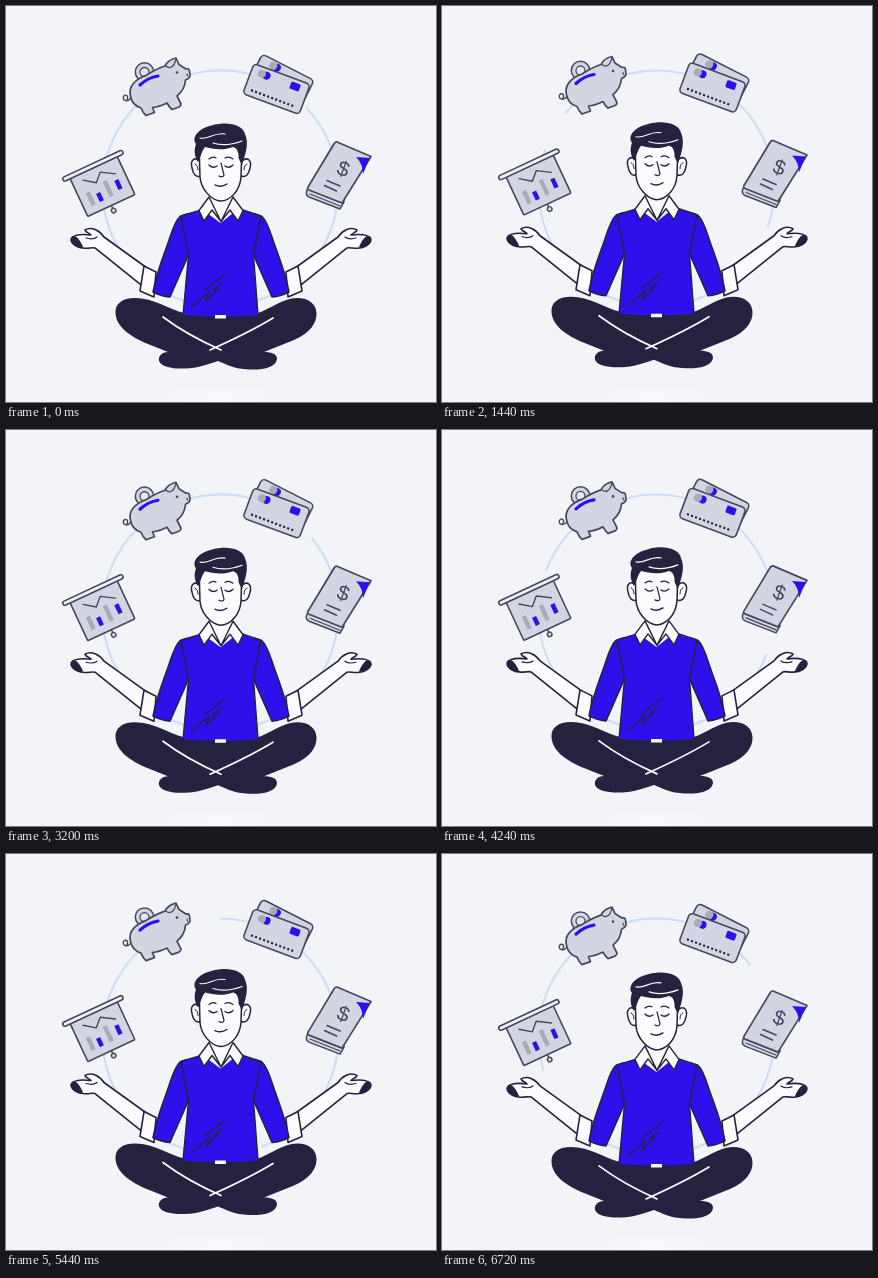
These frames come from a looping animation (430x396 px, 6800 ms). An HTML page with a canvas:

```html
<!DOCTYPE html>
<html lang="en">
<head>
<meta charset="utf-8">
<title>Calm finances</title>
<style>
html, body { margin: 0; width: 100%; height: 100%; overflow: hidden; background: #f3f4f8; }
canvas { display: block; width: 430px; height: 396px; }
</style>
</head>
<body>
<canvas id="stage" width="430" height="396"></canvas>
<script>
const ctx = document.getElementById('stage').getContext('2d');
const LOOP = 6800, STEP = 80, CYCLE = 3130;
const BG = '#f3f4f8', NAVY = '#25223f', BLUE = '#2d10ea', GREY = '#d3d6e2';
const LINE = '#474660', SHADE = '#a9abb9', RING = '#d0def3', WHITE = '#fcfcfe';
const TAU = Math.PI * 2, rad = d => d * Math.PI / 180;

function shape(d, fill, stroke, width = 1.5) {
  const p = new Path2D(d);
  if (fill) { ctx.fillStyle = fill; ctx.fill(p); }
  if (stroke) { ctx.strokeStyle = stroke; ctx.lineWidth = width; ctx.stroke(p); }
}

function disc(x, y, r, fill, stroke, width = 1.5) {
  ctx.beginPath();
  ctx.arc(x, y, r, 0, TAU);
  if (fill) { ctx.fillStyle = fill; ctx.fill(); }
  if (stroke) { ctx.strokeStyle = stroke; ctx.lineWidth = width; ctx.stroke(); }
}

function box(x, y, w, h, r, fill, stroke) {
  ctx.beginPath();
  ctx.roundRect(x, y, w, h, r);
  ctx.fillStyle = fill;
  ctx.fill();
  if (stroke) { ctx.strokeStyle = stroke; ctx.lineWidth = 1.6; ctx.stroke(); }
}

function at(x, y, angle, draw) {
  ctx.save();
  ctx.translate(x, y);
  ctx.rotate(rad(angle));
  draw();
  ctx.restore();
}

function bothSides(draw) {
  draw();
  ctx.save();
  ctx.translate(430, 0);
  ctx.scale(-1, 1);
  draw();
  ctx.restore();
}

function glow() {
  ctx.save();
  ctx.translate(212, 390);
  ctx.scale(1, 0.14);
  const g = ctx.createRadialGradient(0, 0, 10, 0, 0, 68);
  g.addColorStop(0, 'rgba(255,255,255,.5)');
  g.addColorStop(1, 'rgba(255,255,255,0)');
  ctx.fillStyle = g;
  ctx.fillRect(-70, -70, 140, 140);
  ctx.restore();
}

// Two opposite gaps travel clockwise around the ring.
function ring(t) {
  const end = 316.7 + 180 * t / CYCLE;
  ctx.strokeStyle = RING;
  ctx.lineWidth = 2.2;
  for (const turn of [0, 180]) {
    ctx.beginPath();
    ctx.arc(214.3, 182.5, 118, rad(end + turn), rad(end + turn + 160));
    ctx.stroke();
  }
}

function chart() {
  at(96.5, 180.5, -25, () => {
    shape('M0 21V24', null, LINE);
    disc(0, 26.5, 2.3, GREY, LINE, 1.4);
    box(-26, -21, 52, 42, 1, GREY, LINE);
    box(-33, -25, 66, 4.4, 2.2, '#eef0f6', LINE);
    box(-18, -1, 4.5, 14, 0, SHADE);
    box(-9, 4, 4.5, 9, 0, BLUE);
    box(2, -4, 4.5, 17, 0, SHADE);
    box(13, 0, 4.5, 10, 0, BLUE);
    shape('M-15 -14L-4 -6L4 -14L17 -6', null, LINE, 1.4);
  });
}

function pig() {
  disc(138.5, 66, 9.2, GREY, LINE);
  disc(138.5, 66, 4.5, '#e5e7ef', LINE, 1.3);
  shape('M125 92C121 97 116 94 117.500 90.500C119.500 87.500 123 90 121 93.500', null, LINE, 1.4);
  shape('M124.500 90C122 80 130 73 140 69.500C147 65 152 62 159 60C161 56 165 53 170 52L173 58.500'
    + 'L180 63Q183 62 183.500 65L184 70Q183 73 179.500 74C179 80 176 86 171 90L175 98Q175 100 173 101'
    + 'L166 103.500Q163 101 161 97C157 99 152 101 146.500 101.500L148.500 106.500L140 109.500'
    + 'Q137 107 135 102C129 100 125.500 96 124.500 90Z', GREY, LINE, 1.7);
  shape('M160 60C163 63 168 62 170 53', null, LINE, 1.2);
  shape('M134 79Q142 71.500 152 70', null, BLUE, 3.2);
  disc(171, 66.5, 1.3, LINE);
  shape('M181 68L181.500 70', null, LINE, 1.2);
}

function cards() {
  at(275, 75.5, 27, () => {
    box(-29, -16, 58, 32, 4, GREY, LINE);
    disc(-10, -10.5, 4, BLUE);
    disc(-14, -10.5, 4, SHADE);
  });
  at(270.5, 83, 20.5, () => {
    box(-30, -16, 60, 32, 4, GREY, LINE);
    disc(-14, -9, 4, BLUE);
    disc(-19, -9, 4, SHADE);
    box(11.5, -12.5, 10, 7.5, 1.5, BLUE);
    ctx.setLineDash([2.1, 2.2]);
    ctx.lineCap = 'butt';
    shape('M-23.500 10H23.500', null, NAVY, 2.2);
    ctx.setLineDash([]);
    ctx.lineCap = 'round';
  });
}

function book() {
  shape('M328 138L301 184Q299 189 303 191L334 203L338 196Z', GREY, LINE);
  shape('M331 136L365 150.500L336 197L303 184Q301 183 302 181L328 138Q329 135.500 331 136Z', GREY, LINE, 1.7);
  shape('M350 151L363.500 152L357 168Q357 158 350 151Z', BLUE);
  shape('M304 188L334 200', null, LINE, 1.1);
  shape('M321 174.500L334 180M318.500 179.500L330.500 185', null, LINE, 1.6);
  at(337, 164, 20, () => {
    ctx.fillStyle = LINE;
    ctx.font = '21px "Liberation Sans", Arial, sans-serif';
    ctx.textAlign = 'center';
    ctx.textBaseline = 'middle';
    ctx.fillText('$', 0, 0);
  });
}

function legs() {
  shape('M178 307C162 303 148 292 129 292C116 292 109 298 109.500 307C110 321 125 331 142 338'
    + 'L162 346C156 346 152 350 153 355C156 363 176 364 192 361C200 359 206 357 212 355'
    + 'C220 358 228 363 243 363.500C259 364 270 361 271 353C271 348 266 346 258 346'
    + 'L288 334C304 327 311 317 310.500 307C310 298 303 292 291 292C276 292.500 264 303 252 307Z', NAVY);
  shape('M157 311Q181 329 215 344M267 312Q244 326 204 344', null, WHITE, 1.7);
}

function arm() {
  shape('M141 262L98 231C94 225 86 220 79 224C80 227 84 227 85 229C77 228 69 228 65.500 232'
    + 'C64 236 70 242 77 242C82 243 86 241 89 242L135 279Z', WHITE, NAVY, 1.6);
  shape('M66 230.500C70 228.500 74 234 77 241C72 243 65 239 64.500 234Z', NAVY);
  shape('M80 232Q87 234 91 231', null, NAVY, 1.2);
  shape('M138 260L150 266L148 291L134 285Z', WHITE, NAVY, 1.6);
  shape('M181 208L174 210.500C170 214 167 222 164 231C159 247 151 264 147 286Q154 290 164 291L182.500 249Z', BLUE, NAVY, 1.5);
}

function torso() {
  shape('M195 204L175 210L182.500 249L177 309Q214 312 252 309L247.500 249L254 210L234 203Z', BLUE);
  shape('M195 204L175 210L182.500 249L177 309M234 203L255 210L247.500 249L252 309', null, NAVY, 1.4);
  shape('M186 301L203 286L200 295L213 282M199 284L220 268M207 285L216 277', null, NAVY, 1.2);
  shape('M203 186L197 204L214.500 217L231 204L226 186Z', WHITE);
  bothSides(() => shape('M203 191L193 204.500L198 215L206 204L215 215.500L203 191Z', WHITE, NAVY, 1.4));
  box(209, 309, 11, 3.6, 0.5, WHITE);
}

function head() {
  bothSides(() => {
    shape('M194 155C188 150 184 155 186 162C187 168 190 172 195 170', WHITE, NAVY, 1.5);
    shape('M189 158Q192 159 192 164', null, NAVY, 1);
  });
  shape('M193 136L194 171C195 183 205 194 214 195C225 195 234 184 235 171L236 136', WHITE, NAVY, 1.5);
  shape('M192 156C188 150 188 143 190 138C185 131 193 122 207 119C222 115 237 119 239 128'
    + 'C243 137 240 147 236 159L232.500 152C233 146 231 142 227 141C217 145 206 143 199 141C195 146 195 151 192 156Z', NAVY);
  shape('M194 132C203 134 207 126 219 128M207 137C216 140 228 138 236 135', null, WHITE, 1.2);
  shape('M203 153Q207 150 210 152M219 152Q223 150 227 153', null, NAVY, 1.2);
  shape('M203 159Q207 163 211 160M219 160Q223 163 227 159', null, NAVY, 1.3);
  shape('M215 157L218 169Q217 172 213 170', null, NAVY, 1.2);
  shape('M209 179Q215 182 221 178', null, NAVY, 1.4);
}

function draw(t) {
  const sway = Math.cos(TAU * (t - 540) / CYCLE) - 0.47;
  ctx.setTransform(1, 0, 0, 1, 0, 0);
  ctx.fillStyle = BG;
  ctx.fillRect(0, 0, 430, 396);
  ctx.lineJoin = 'round';
  ctx.lineCap = 'butt';
  glow();
  ring(t);
  ctx.lineCap = 'round';
  ctx.save();
  ctx.translate(0, 2.1 * sway);
  [chart, pig, cards, book].forEach(icon => icon());
  ctx.restore();
  ctx.translate(0, 1.8 * sway);
  legs();
  bothSides(arm);
  torso();
  head();
}

const start = performance.now();
function frame() {
  const t = (performance.now() - start) % LOOP;
  draw(Math.floor(t / STEP) * STEP);
  requestAnimationFrame(frame);
}
frame();
</script>
</body>
</html>
```
